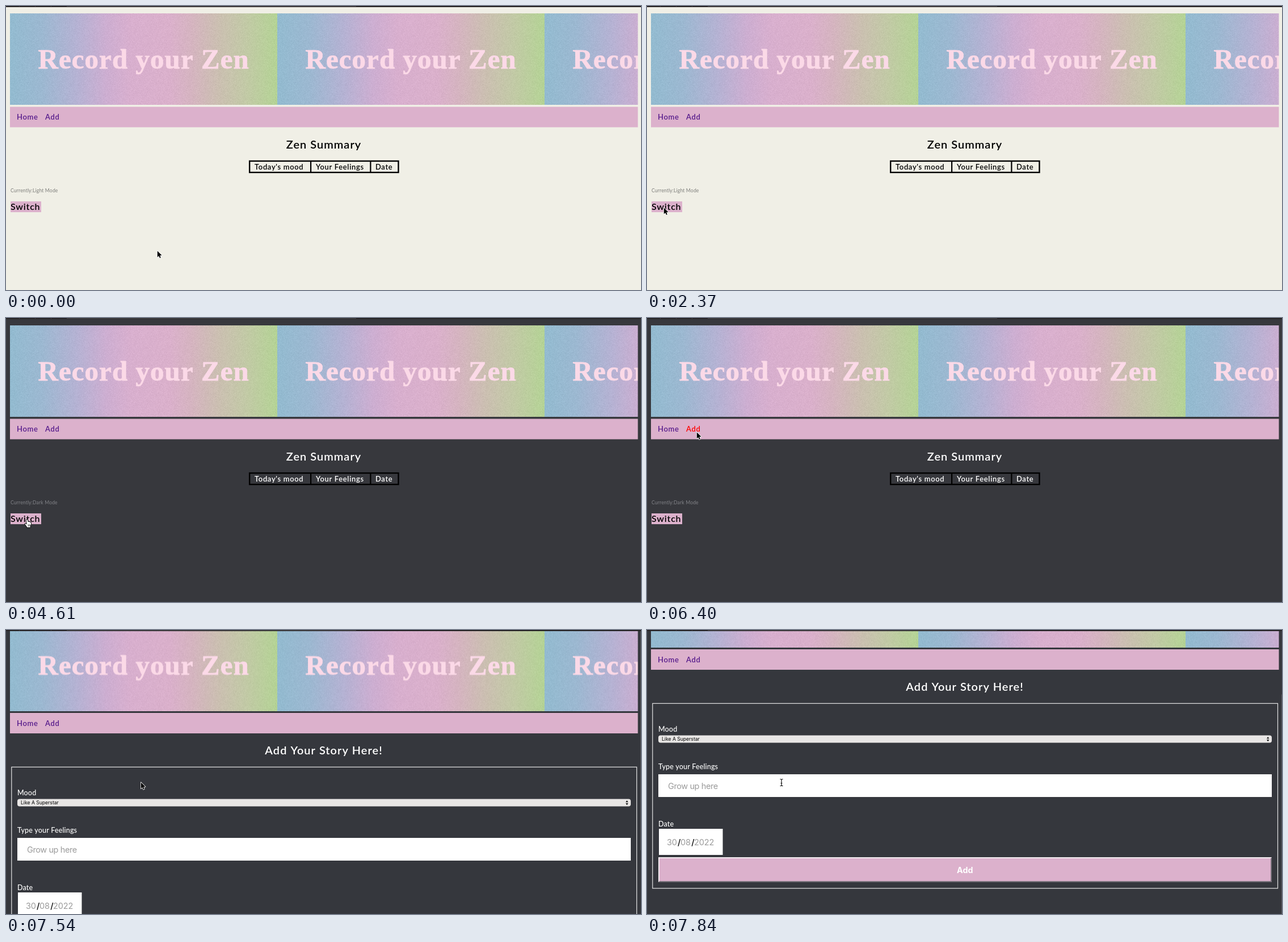
An HTML page with a canvas that plays this animation: 1119 by 500 pixels, repeating every 7.99 s.

```html
<!DOCTYPE html>
<html lang="en">
<head>
<meta charset="utf-8">
<title>Record your Zen</title>
<style>
html, body { margin: 0; width: 100%; height: 100%; overflow: hidden; background: #f0efe6; }
canvas { display: block; }
</style>
</head>
<body>
<canvas id="stage" width="1119" height="500"></canvas>
<script>
const LOOP = 7990, W = 1119, H = 500;
const ctx = document.getElementById('stage').getContext('2d');
const PINK = '#dcb1cc', LINK = '#551a8b';
const SANS = 'Lato, "Open Sans", sans-serif';
const UI = 'Inter, Roboto, sans-serif';

const DARK_AT = 4610, FORM_AT = 6940;
const light = { bg: '#f0efe6', ink: '#000', note: '#7e7e7b', mode: 'Light' };
const dark = { bg: '#37383d', ink: '#fff', note: '#828388', mode: 'Dark' };

// [time, x, y, shape]: the pointer holds each pose until the next
const pointer = [
  [0, 266, 430, 'arrow'], [140, 130, 431, 'arrow'], [290, 7, 426, 'arrow'],
  [580, 8, 418, 'arrow'], [730, 14, 394, 'arrow'], [870, 23, 368, 'arrow'],
  [1020, 28, 353, 'arrow'], [2070, 28, 354, 'arrow'], [2370, 29, 354, 'arrow'],
  [3270, 32, 355, 'arrow'], [3420, 37, 354, 'hand'], [3560, 38, 354, 'hand'],
  [5360, 44, 349, 'hand'], [5510, 66, 328, 'arrow'], [5660, 100, 291, 'arrow'],
  [5800, 129, 250, 'arrow'], [5950, 140, 224, 'arrow'], [6100, 128, 210, 'arrow'],
  [6250, 104, 202, 'arrow'], [6400, 87, 200, 'arrow'], [7090, 237, 267, 'arrow'],
  [7840, 237, 268, 'beam']
];
const scrolls = [[0, 0], [7540, 31.5], [7690, 101.5], [7840, 143.5]];

function held(keys, t) {
  let now = keys[0];
  for (const key of keys) if (key[0] <= t) now = key;
  return now;
}

function rect(x, y, w, h, color) {
  ctx.fillStyle = color;
  ctx.fillRect(x, y, w, h);
}

function text(str, x, y, font, color, spacing = 0, align = 'left', g = ctx) {
  g.font = font;
  g.letterSpacing = spacing + 'px';
  g.textAlign = align;
  g.fillStyle = color;
  g.fillText(str, x, y);
}

function shape(points, fill, stroke, width) {
  const path = new Path2D();
  points.forEach(([x, y], i) => i ? path.lineTo(x, y) : path.moveTo(x, y));
  path.closePath();
  ctx.lineJoin = 'round';
  if (stroke) {
    ctx.strokeStyle = stroke;
    ctx.lineWidth = width;
    ctx.stroke(path);
  }
  ctx.fillStyle = fill;
  ctx.fill(path);
}

function makeTile() {
  const tile = document.createElement('canvas');
  tile.width = 471;
  tile.height = 161;
  const g = tile.getContext('2d');
  const fade = g.createLinearGradient(0, 0, 471, 0);
  [[0, '#93bbd0'], [.12, '#9cb8d1'], [.25, '#b5b2d3'], [.36, '#cdaed1'],
   [.45, '#d8afce'], [.6, '#dab0cb'], [.68, '#d5b4c0'], [.78, '#cbbfb1'],
   [.88, '#c2c9a6'], [1, '#b4d395']].forEach(([at, c]) => fade.addColorStop(at, c));
  g.fillStyle = fade;
  g.fillRect(0, 0, 471, 161);

  // paper grain
  const img = g.getImageData(0, 0, 471, 161);
  let seed = 7;
  for (let i = 0; i < img.data.length; i += 4) {
    seed = (seed * 1664525 + 1013904223) >>> 0;
    const n = (seed / 4294967296 - .5) * 13;
    for (let c = 0; c < 3; c++) img.data[i + c] += n;
  }
  g.putImageData(img, 0, 0);

  const serif = 'bold 49px "Liberation Serif", "Times New Roman", serif';
  text('Record your Zen', 49.5, 97, serif, '#fbd9e7', 1.05, 'left', g);
  g.strokeStyle = '#fbd9e7';
  g.lineWidth = .8;
  g.strokeText('Record your Zen', 49.5, 97);
  return tile;
}
const tile = makeTile();

function header(hover) {
  ctx.save();
  ctx.beginPath();
  ctx.rect(7, 0, 1106.5, 220);
  ctx.clip();
  for (let i = 0; i < 3; i++) ctx.drawImage(tile, 7 + i * 471, 13);
  ctx.restore();
  rect(7, 177.5, 1106.5, 36, PINK);
  text('Home', 19, 200, `600 13px ${SANS}`, LINK, .65);
  text('Add', 69, 200, `600 13px ${SANS}`, hover ? '#f00' : LINK, .65);
}

function title(str, ink) {
  text(str, 560, 250.5, `600 20px ${SANS}`, ink, 1, 'center');
}

function summary(theme) {
  title('Zen Summary', theme.ink);
  ctx.strokeStyle = '#000';
  ctx.lineWidth = 2.4;
  ctx.strokeRect(429.2, 273, 262.3, 20);
  rect(536, 273, 2.2, 20, '#000');
  rect(641.3, 273, 2.2, 20, '#000');
  [["Today's mood", 438], ['Your Feelings', 546], ['Date', 651]].forEach(
    ([str, x]) => text(str, x, 287.8, `600 13px ${SANS}`, theme.ink, .65));
  text(`Currently:${theme.mode} Mode`, 8, 327.6, `8.6px ${SANS}`, theme.note, .15);
  rect(8, 344, 54, 19, PINK);
  text('Switch', 8, 359, `600 16px ${SANS}`, '#000', .8);
}

function form() {
  const label = (str, y) => text(str, 20, y, `500 12.5px ${SANS}`, '#fff', .15);
  const field = `14.5px ${UI}`, hint = '#9b9b9b';
  title('Add Your Story Here!', '#fff');
  ctx.strokeStyle = '#e6e6e6';
  ctx.lineWidth = 1.2;
  ctx.strokeRect(9.8, 272.8, 1101.7, 325.5);

  label('Mood', 322.7);
  ctx.fillStyle = '#e8e6e5';
  ctx.beginPath();
  ctx.roundRect(20, 329, 1081, 13, 4);
  ctx.fill();
  text('Like A Superstar', 26, 338.7, `8.6px ${UI}`, '#000');
  shape([[1092, 334.7], [1096.4, 334.7], [1094.2, 331.6]], '#111');
  shape([[1092, 336.6], [1096.4, 336.6], [1094.2, 339.7]], '#111');

  label('Type your Feelings', 388);
  rect(20, 397.5, 1081, 40, '#fff');
  text('Grow up here', 37, 423.3, field, hint, -.4);

  label('Date', 489);
  rect(21, 493.5, 112.5, 46, '#fff');
  [['30', 35], ['08', 59], ['2022', 83]].forEach(
    ([str, x]) => text(str, x, 522.7, field, hint, -.1));
  [54, 78.3].forEach(x => text('/', x, 522.7, `500 ${field}`, '#000'));

  rect(20, 543.5, 1081, 44, '#f4ecf1');
  shape([[1101, 543.5], [1101, 587.5], [20, 587.5], [22, 585.5],
         [1099, 585.5], [1099, 545.5]], '#77717a');
  rect(22, 545.5, 1077, 40, PINK);
  text('Add', 560.3, 571, `700 14.3px ${UI}`, '#fff', 0, 'center');
}

function drawPointer([, x, y, kind]) {
  ctx.save();
  ctx.translate(x, y);
  if (kind === 'arrow') {
    shape([[.8, 1.2], [.8, 12.2], [3.3, 9.9], [5, 13.7], [6.8, 12.9],
           [5.2, 9.2], [8.6, 9]], '#000', '#fff', 1.6);
  } else if (kind === 'hand') {
    shape([[-2.2, 1.4], [-1.2, .6], [-.2, 1.2], [.8, 5], [2.2, 4.4], [3.2, 5.2],
           [4.6, 5], [5.2, 6.2], [6, 6.4], [6.2, 9], [5, 12.4], [4.8, 14.6],
           [-.8, 14.6], [-2, 12.2], [-4.6, 9], [-4, 8], [-2.6, 8.4], [-1.2, 9.6]],
          '#fff', '#000', 1.8);
    [1, 2.8, 4.4].forEach(fx => rect(fx - .3, 9.3, .7, 3.4, '#000'));
  } else {
    const beam = new Path2D('M-2.5-5.5Q0-5.5 0-4Q0-5.5 2.5-5.5M0-4V5M-2.5 6.5Q0 6.5 0 5Q0 6.5 2.5 6.5M-1.3 1.8H1.3');
    ctx.strokeStyle = '#000';
    ctx.lineWidth = 1.1;
    ctx.stroke(beam);
  }
  ctx.restore();
}

function topEdge(isDark) {
  rect(0, 0, W, 1, '#211d1f');
  rect(107, 0, 510, 1, '#474547');
  rect(0, 1, W, 1, isDark ? '#29282b' : '#2b2627');
  [23, 51, 79].forEach(x => rect(x, 0, 1, 1, '#4a4749'));
}

function draw(t) {
  const isDark = t >= DARK_AT, onForm = t >= FORM_AT;
  const theme = isDark ? dark : light;
  const scroll = held(scrolls, t)[1];
  rect(0, 0, W, H, onForm ? '#35373d' : theme.bg);
  ctx.save();
  ctx.translate(0, -scroll);
  header(t >= 6400 && t < 7090);
  if (onForm) form();
  else summary(theme);
  ctx.restore();
  if (scroll) rect(1118, scroll - 30, 1, 386, '#57585d');
  topEdge(isDark);
  drawPointer(held(pointer, t));
}

function tick(now) {
  draw(now % LOOP);
  requestAnimationFrame(tick);
}
requestAnimationFrame(tick);
</script>
</body>
</html>
```
